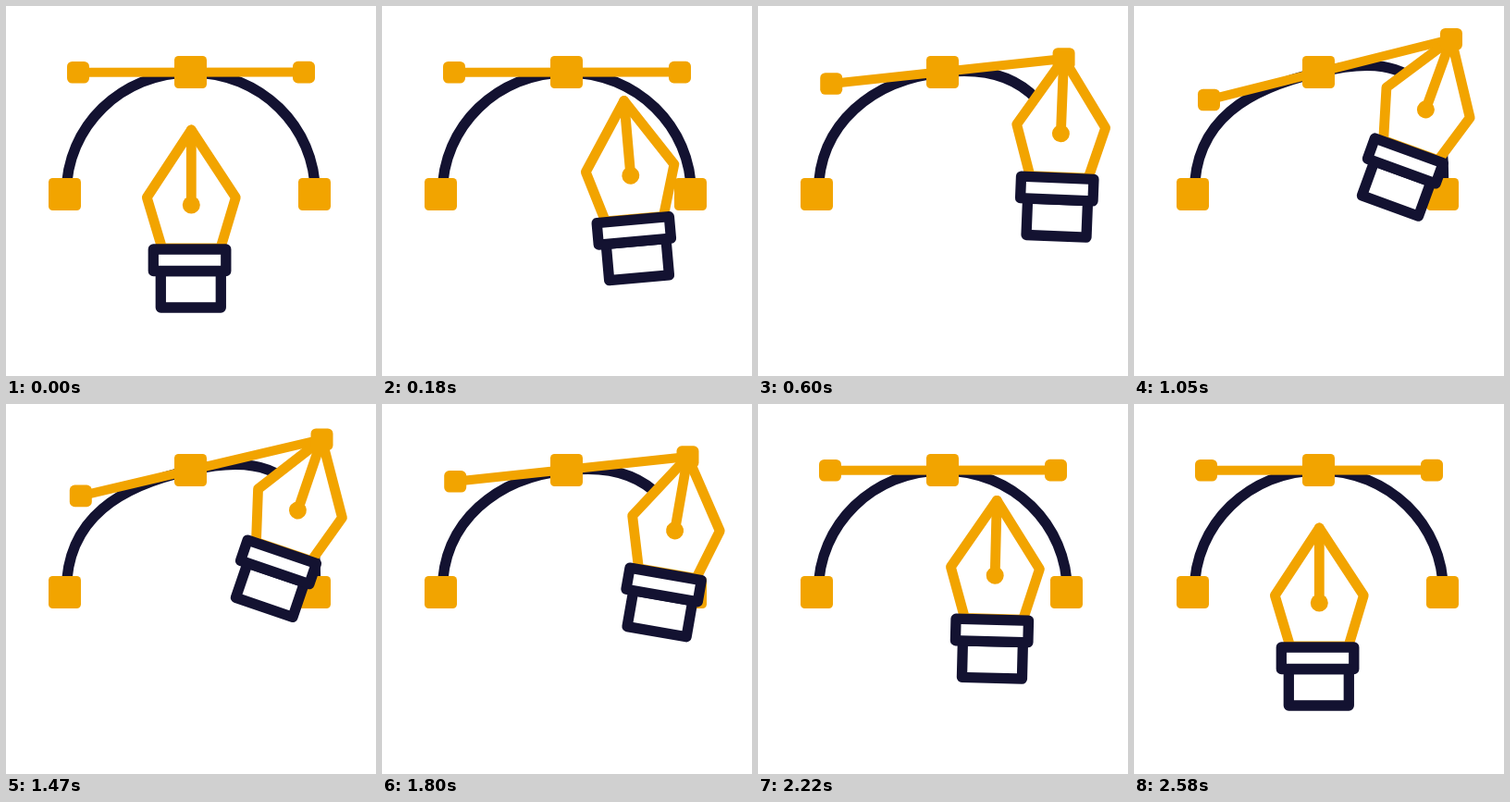
Write an HTML page that moves like this. It is 400 by 400 pixels and loops after 4610 ms.

```html
<!DOCTYPE html>
<html lang="en">
<head>
<meta charset="utf-8">
<title>Pen tool</title>
<style>
  html, body { margin: 0; width: 100%; height: 100%; overflow: hidden; background: #fff; }
  svg { display: block; width: 100%; height: 100%; }
  .gold { fill: #f2a400; }
  .line { fill: none; stroke: #f2a400; stroke-width: 10; stroke-linecap: round; stroke-linejoin: round; }
  .ink { fill: none; stroke: #131231; stroke-width: 11.3; stroke-linejoin: round; }
  .solid { fill: #fff; }
  #pen .line { stroke-width: 10.8; }
</style>
</head>
<body>
<svg viewBox="0 0 400 400">
  <path id="curve" class="ink"/>
  <path id="handle" class="line"/>
  <rect class="gold" x="46" y="186" width="35" height="35" rx="4.5"/>
  <rect class="gold" x="316" y="186" width="35" height="35" rx="4.5"/>
  <rect class="gold" x="182" y="54" width="35" height="35" rx="4.5"/>
  <rect id="left" class="gold" x="-12" y="-11.8" width="24" height="23.6" rx="5.5"/>
  <!-- pen, with its tip at 0,0 -->
  <g id="pen">
    <path class="line solid" d="M0 0L48 73L31.5 128H-31.5L-48 73Z"/>
    <path class="line" d="M0 0V81"/>
    <circle class="gold" cx="0" cy="81" r="9.5"/>
    <path class="ink solid" d="M-33 152.5H32V192H-33Z"/>
    <path class="ink solid" d="M-41 129H37.5V152.5H-41Z"/>
  </g>
  <rect id="right" class="gold" x="-12" y="-11.8" width="24" height="23.6" rx="5.5"/>
</svg>
<script>
const LOOP = 4610;
const HOME = [200.3, 134];
const MID = [200, 71.8];
const $ = id => document.getElementById(id);
const mix = (a, b, k) => a + (b - a) * k;
const mixPt = (a, b, k) => [mix(a[0], b[0], k), mix(a[1], b[1], k)];
const span = (t, from, to) => Math.min(1, Math.max(0, (t - from) / (to - from)));
const sine = x => (1 - Math.cos(Math.PI * x)) / 2;

// cubic-bezier(x1, 0, x2, 1)
function bezier(x, x1, x2) {
  let lo = 0, hi = 1, s = 0.5;
  for (let i = 0; i < 24; i++) {
    s = (lo + hi) / 2;
    const at = 3 * (1 - s) * (1 - s) * s * x1 + 3 * (1 - s) * s * s * x2 + s * s * s;
    if (at < x) lo = s; else hi = s;
  }
  return s * s * (3 - 2 * s);
}

function place(id, p, angle = 0) {
  $(id).setAttribute('transform', `translate(${p}) rotate(${angle})`);
}

function draw(t) {
  const arrive = sine(span(t, 0, 360));
  const pull = bezier(span(t, 405, 1090), 0.33, 0.2)
             - bezier(span(t, 1200, 2040), 0.8, 0.67);
  // the way home runs a little too far, then settles
  const leave = 1.09 * sine(span(t, 2022, 2430)) - 0.09 * sine(span(t, 2430, 2580));

  const left = mixPt([78, 71.8], [81, 101.5], pull);
  const right = mixPt([322, 71.6], [343, 35.7], pull);
  $('handle').setAttribute('d', `M${left}L${right}`);
  place('left', left);
  place('right', right);

  const a = mixPt([65, 130], [65, 122], pull);
  const b = mixPt([125, 72], [125, 89], pull);
  const c = mixPt([275, 72], [314, 43], pull);
  const d = mixPt([334.5, 130], [337, 100], pull);
  $('curve').setAttribute('d', `M65.3 203C${a} ${b} ${MID}C${c} ${d} 334.3 203`);

  const out = t < 1140;
  const tip = mixPt(HOME, right, out ? arrive : 1 - leave);
  const angle = out ? -10 * arrive + 30 * pull : 3 * (1 - leave) + 17 * pull;
  place('pen', tip, angle);
}

const start = performance.now();
function tick() {
  draw((performance.now() - start) % LOOP);
  requestAnimationFrame(tick);
}
tick();
</script>
</body>
</html>
```
